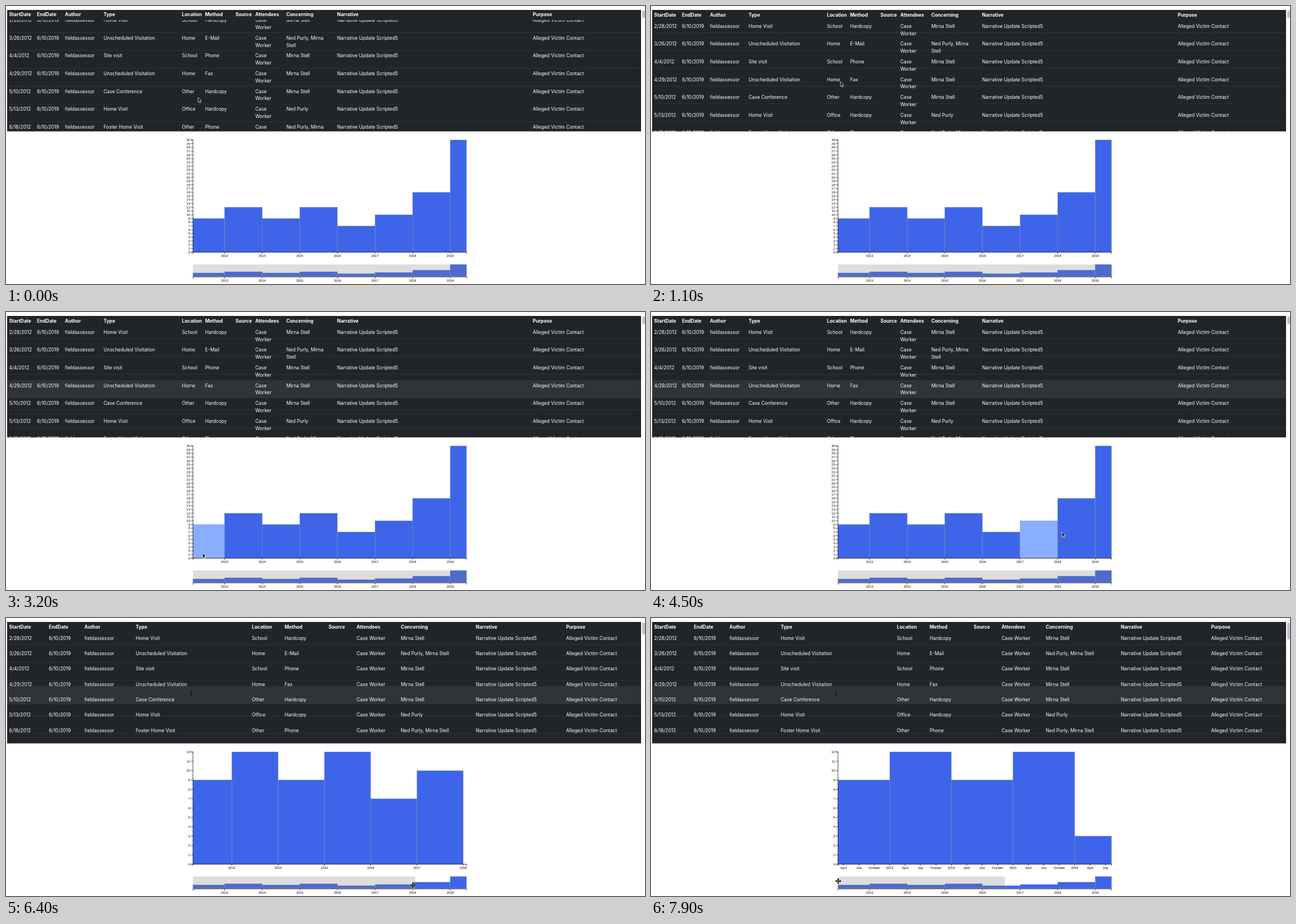
These frames come from a looping animation (1133x494 px, 8 s). An HTML page:

```html
<!DOCTYPE html>
<html lang="en">
<head>
<meta charset="utf-8">
<title>Case notes timeline</title>
<style>
  html, body { margin: 0; width: 100%; height: 100%; overflow: hidden; background: #fff; }
  svg { display: block; width: 1133px; height: 494px; }
  .table { font: 8.4px Inter, sans-serif; fill: #fff; }
  .head { font-weight: 700; }
  .chart { font: 5.6px "Liberation Sans", Arial, sans-serif; fill: #000; }
  .bar { fill: #3e65e9; stroke: #878ba0; stroke-width: .4; }
  .bar.hot { fill: #8aaeff; }
  .axis { fill: none; stroke: #000; stroke-width: .7; }
</style>
</head>
<body>
<svg viewBox="0 0 1133 494">
  <defs>
    <clipPath id="body"><rect x="2" y="25" width="1124" height="197.8"/></clipPath>
    <path id="arms" d="M-4 0H4M0-4V4M-1.5-2.9 0-4.4 1.5-2.9M-1.5 2.9 0 4.4 1.5 2.9M-2.9-1.5-4.4 0-2.9 1.5M2.9-1.5 4.4 0 2.9 1.5"/>
  </defs>
  <rect x="2" y="7" width="1124" height="215.8" fill="#212529"/>
  <path id="rules" stroke="#fff" stroke-opacity=".1" stroke-width=".7"/>
  <rect id="band" x="2" y="121" width="1124" height="32" fill="#303337"/>
  <g class="table">
    <g clip-path="url(#body)"><g id="rows"></g></g>
    <g id="head" class="head"></g>
  </g>
  <path id="beam" d="M326.8 130.5q1.2 0 1.2 1v5q0 1-1.2 1M329.2 130.5q-1.2 0-1.2 1v5q0 1 1.2 1" fill="none" stroke="#0b0d0f" stroke-width=".8"/>
  <rect id="thumb" x="1128" y="8" width="5" rx="2.4" fill="#c1c1c4"/>
  <g id="main" class="chart"></g>
  <g id="mini" class="chart"></g>
  <rect id="brush" x="331.5" y="459.3" height="21.4" fill="#777" fill-opacity=".25"/>
  <path id="arrow" d="M0 0V8.4L1.9 6.7 3.3 9.8 4.8 9.1 3.4 6.1H6.1z" fill="#111" stroke="#fff" stroke-width=".7"/>
  <g id="cross" fill="none">
    <use href="#arms" stroke="#fff" stroke-width="2.4"/>
    <use href="#arms" stroke="#000" stroke-width="1.3"/>
  </g>
</svg>
<script>
const LOOP = 8000, STEP = 100;
const HOVER_AT = 1200, DRAG_FROM = 5600, DRAG_TO = 7200, REFLOW = 5700;
const LEFT = 331.5, RIGHT = 816.5, START = 2012.16, PX_YEAR = 66.7;
const END = START + (RIGHT - LEFT) / PX_YEAR;
const TOP = 238, BASE = 437.5, MINI_BASE = 480.7;
const TOTALS = [9, 12, 9, 12, 7, 10, 16, 30];

// Column title, then its left edge while cells wrap and after they stop wrapping
const COLUMNS = [
  ['StartDate', 5.5, 5.5], ['EndDate', 55, 76], ['Author', 104.5, 139], ['Type', 173, 230],
  ['Location', 312, 436], ['Method', 353, 494], ['Source', 407, 572], ['Attendees', 442, 621.5],
  ['Concerning', 497, 700], ['Narrative', 587, 833], ['Purpose', 934, 993]
];
const WOMAN = 'Mirna Stell', MAN = 'Ned Purly', BOTH = MAN + ', ' + WOMAN;
const VISITS = [
  ['2/28/2012', 'Home Visit', 'School', 'Hardcopy', WOMAN],
  ['3/26/2012', 'Unscheduled Visitation', 'Home', 'E-Mail', BOTH],
  ['4/4/2012', 'Site visit', 'School', 'Phone', WOMAN],
  ['4/29/2012', 'Unscheduled Visitation', 'Home', 'Fax', WOMAN],
  ['5/10/2012', 'Case Conference', 'Other', 'Hardcopy', WOMAN],
  ['5/13/2012', 'Home Visit', 'Office', 'Hardcopy', MAN],
  ['6/18/2012', 'Foster Home Visit', 'Other', 'Phone', BOTH]
];
// Pointer stops: time, x, y
const STOPS = [
  [400, 340.5, 162.5], [1100, 336, 134.5], [1700, 400, 464], [2300, 328, 131],
  [2800, 346, 450], [3200, 348.5, 428.5], [4500, 728.5, 391], [DRAG_FROM, 811.3, 470],
  [6400, 721.5, 475], [DRAG_TO, 623.3, 474], [7900, 332, 467.5]
];

const $ = id => document.getElementById(id);
const clamp = v => Math.min(1, Math.max(0, v));

function pointer(t) {
  const next = STOPS.findIndex(s => s[0] > t);
  if (next < 1) return STOPS.at(next).slice(1);
  const [t0, x0, y0] = STOPS[next - 1], [t1, x1, y1] = STOPS[next];
  const p = (t - t0) / (t1 - t0);
  return [x0 + (x1 - x0) * p, y0 + (y1 - y0) * p];
}

// The brush edge is pulled along by the pointer
const brushEdge = t => t < DRAG_FROM ? RIGHT : pointer(Math.min(t, DRAG_TO))[0] + 4.2;
const brushYear = t => START + (brushEdge(t) - LEFT) / PX_YEAR;

// Events left in each year's bar after filtering
function counts(t) {
  const end = brushYear(t);
  if (end >= END) return TOTALS;
  return TOTALS.map((n, i) => {
    const part = end - 2012 - i;
    return i < 7 ? Math.round(n * clamp(part) ** 1.6) : Math.ceil(22 * clamp(part / (END - 2019)));
  });
}
const peak = t => Math.max(...counts(t));

// Bar heights follow the axis a few steps late
const latePeak = t =>
  [1, 2, 3].reduce((sum, i) => sum + peak(Math.max(0, t - i * STEP)), 0) / 3;

const label = (x, y, s, anchor = 'start') =>
  `<text x="${x.toFixed(2)}" y="${y.toFixed(2)}" text-anchor="${anchor}">${s}</text>`;

function layout(wide) {
  const left = COLUMNS.map(c => c[wide ? 2 : 1]), pitch = wide ? 27.35 : 31.62;
  $('head').innerHTML = COLUMNS.map(([s], c) => label(left[c], 19.2, s)).join('');
  $('rows').innerHTML = VISITS.map(([date, type, place, method, who], i) => {
    const y = 38.7 + i * pitch;
    const cells = [date, '6/10/2019', 'fieldassessor', type, place, method, '',
      'Case Worker', who, 'Narrative Update Scripted5', 'Alleged Victim Contact'];
    return cells.map((s, c) => {
      const wraps = !wide && (c === 7 || s === BOTH);
      if (!wraps) return label(left[c], y, s);
      const cut = s.lastIndexOf(' ');
      return label(left[c], y, s.slice(0, cut)) + label(left[c], y + 12.8, s.slice(cut + 1));
    }).join('');
  }).join('');
}

function xAxis(y, end, scale) {
  let d = `M${LEFT} ${y + 3}V${y}H${RIGHT + .3}V${y + 3}`, text = '';
  const step = end - START < 5 ? .25 : 1;
  for (let v = Math.ceil(START / step) * step; v < end; v += step) {
    const x = scale(v), quarter = v % 1 * 4;
    d += `M${x} ${y}v3`;
    text += label(x, y + 8.2, quarter ? ['April', 'July', 'October'][quarter - 1] : v, 'middle');
  }
  return `<path class="axis" d="${d}"/>` + text;
}

function yAxis(max) {
  let d = `M${LEFT - 4} ${TOP}H${LEFT}V${BASE}H${LEFT - 4}`, text = '';
  for (let v = 0; v <= max; v++) {
    const y = BASE - v / max * (BASE - TOP);
    d += `M${LEFT - 4} ${y}h4`;
    text += label(LEFT - 5.2, y + 2, v, 'end');
  }
  return `<path class="axis" d="${d}"/>` + text;
}

function bars(values, scale, base, unit, end, [px, py]) {
  return values.map((n, i) => {
    if (!n) return '';
    const x = scale(Math.max(START, 2012 + i)), x2 = scale(Math.min(end, 2013 + i));
    const h = n * unit;
    const hot = px >= x && px < x2 && py < base && py > base - h;
    return `<rect class="bar${hot ? ' hot' : ''}" x="${x}" y="${base - h}" width="${x2 - x}" height="${h}"/>`;
  }).join('');
}

const scaleTo = end => v => LEFT + (v - START) / (end - START) * (RIGHT - LEFT);

function drawMain(t) {
  const end = brushYear(t), scale = scaleTo(end);
  const unit = (BASE - TOP) / latePeak(t);
  $('main').innerHTML = bars(counts(t), scale, BASE, unit, end, pointer(t - STEP)) +
    xAxis(BASE, end, scale) + yAxis(peak(t));
}

function drawMini() {
  const scale = scaleTo(END);
  $('mini').innerHTML = bars(TOTALS, scale, MINI_BASE, 21.4 / 30, END, []) +
    xAxis(481.4, END, scale);
}

const show = (id, on) => $(id).style.display = on ? '' : 'none';
const move = (id, x, y) => $(id).setAttribute('transform', `translate(${x} ${y})`);
let shownWide = null, shownTime = -1;

function render(t) {
  const wide = t >= REFLOW;
  if (wide !== shownWide) layout(shownWide = wide);

  const scroll = 10.5 * (1 - clamp(t / 800)) ** 3;
  move('rows', 0, -scroll);
  move('head', 0, -.07 * scroll);
  show('band', t >= HOVER_AT);
  show('beam', t >= HOVER_AT + 2 * STEP);

  const edge = brushEdge(t);
  $('brush').setAttribute('width', edge - LEFT);
  $('thumb').setAttribute('height', 13.5 + (RIGHT - edge) * .088);
  drawMain(t);

  const dragging = t >= DRAG_FROM - STEP;
  show('arrow', !dragging);
  show('cross', dragging);
  move(dragging ? 'cross' : 'arrow', ...pointer(t));
}

function tick() {
  const t = Math.floor(performance.now() % LOOP / STEP) * STEP;
  if (t !== shownTime) render(shownTime = t);
  requestAnimationFrame(tick);
}

$('rules').setAttribute('d', VISITS.slice(1).map((_, i) => `M2 ${47.3 + i * 31.68}H1126`).join(''));
drawMini();
tick();
</script>
</body>
</html>
```
